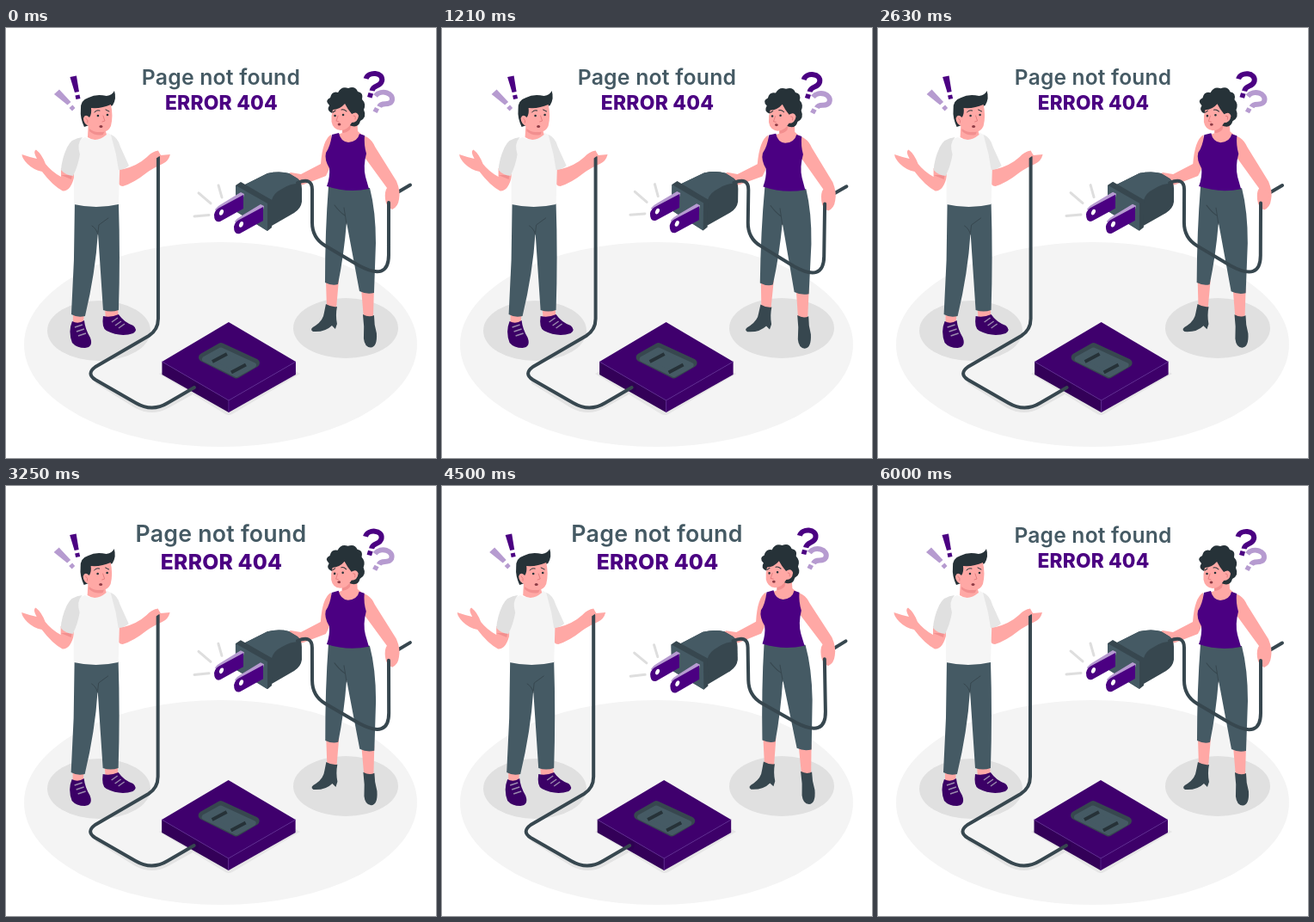
Write an HTML page that moves like this. It is 500 px wide and 500 px high and loops after 6.04 s.

```html
<!DOCTYPE html>
<html lang="en">
<head>
<meta charset="utf-8">
<title>Page not found</title>
<style>
  html, body { margin: 0; width: 100%; height: 100%; overflow: hidden; background: #fff; }
  svg { display: block; width: 100%; height: 100%; }
  text { font-family: Inter, Roboto, sans-serif; text-anchor: middle; letter-spacing: .2px; }
  .skin { fill: #ffa8a5; }
  .shade { fill: #f28f8f; }
  .hair { fill: #263238; }
  .slate { fill: #455a64; }
  .dark { fill: #37474f; }
  .purple { fill: #4b0082; }
  .plum { fill: #3b0066; }
  .lilac { fill: #b69bd0; }
  .line { fill: none; stroke: #37474f; stroke-width: 4; stroke-linecap: round; stroke-linejoin: round; }
  .thin { fill: none; stroke: #263238; stroke-width: 1; stroke-linecap: round; }
</style>
</head>
<body>
<svg viewBox="0 0 500 500">
  <!-- floor and shadows -->
  <ellipse cx="249.500" cy="368" rx="228.500" ry="119" fill="#f4f4f4"/>
  <g fill="#e0e0e0">
    <ellipse cx="108" cy="352" rx="60" ry="35"/>
    <ellipse cx="395" cy="349" rx="61" ry="35"/>
    <path fill="#e6e6e6" d="M178 402L259 356L342 402L263 449Q259 451 255 449Z"/>
  </g>
  <path class="line" style="stroke:#e3e3e3" d="M106 412L151 440Q170 450 188 440L215 425"/>

  <g id="title">
    <text x="250" y="66" font-size="24.500" font-weight="600" fill="#455a64">Page not found</text>
    <text x="250.500" y="95" font-size="22.600" font-weight="800" class="purple">ERROR 404</text>
  </g>

  <g id="left">
    <!-- exclamation marks -->
    <path class="purple" d="M74.500 57L82 55.500L85 74L80 75ZM80.500 78.500L85.500 77.500L86.500 82L81.500 83Z"/>
    <path class="lilac" d="M56 77L62 71.500L75.500 86L71.500 89.500ZM73.500 93L77.500 89.500L80.500 93L77 96.500Z"/>

    <!-- socket -->
    <path fill="#3f006d" d="M181.500 388L259 342L337 388L259 433Z"/>
    <path fill="#330058" d="M181.500 388L259 433V447L181.500 403Z"/>
    <path fill="#3d0069" d="M337 388L259 433V447L337 403Z"/>
    <path fill="none" stroke="#5a2590" stroke-width=".8" d="M181.500 388L259 433L337 388M259 433V447"/>
    <g stroke-linejoin="round" stroke-width="10">
      <path fill="#37474f" stroke="#37474f" d="M250 371L290 389.500L268 402.500L229 383Z"/>
      <path fill="#455a64" stroke="#455a64" stroke-width="6" d="M250 374.500L288 392L268 403L231 385Z"/>
    </g>
    <path fill="none" stroke="#263238" stroke-width="4" d="M240 388L257 379M262 400.500L279 391.500"/>
    <ellipse cx="220" cy="418" rx="4.500" ry="5.500" fill="#2e0052"/>

    <!-- legs -->
    <path class="skin" d="M78 330H91L90 344H78ZM115 326H130L131 337L116 338Z"/>
    <path class="plum" d="M77 341Q84 345 91 340Q92 350 98 360Q102 371 92 372Q82 372 77 366Q72 353 77 341Z"/>
    <path class="plum" d="M113 335Q122 337 131 333Q137 342 148 346Q154 351 148 355Q133 360 117 352Q111 349 113 335Z"/>
    <path fill="none" stroke="#9a8aac" stroke-width="1.500" d="M80 348L89 345M82 353L91 350M84 358L93 355M123 342L130 337M127 346L134 341M131 349L138 344"/>
    <path class="slate" d="M80 203L131 204Q133 265 131 328Q122 331 113 328L107 238Q104 285 92 335Q83 337 76 333L79 270Z"/>
    <path class="thin" style="stroke:#37474f" d="M107 238L108 229L119 221M107 240Q105 233 100 230"/>

    <!-- arms -->
    <path class="skin" d="M64 163L64 173Q53 167 46 158Q42 147 35 141.500Q31 143 36 152Q27 150 18.500 147Q19 152 25 158Q32 165 42 167Q54 183 66 189.500Q76 190 80 170Z"/>
    <path class="shade" d="M64 171L76 176L77 171Z"/>
    <path class="skin" d="M130 160L137 164Q153 160 164 150Q169 144 177 142.500L180 148L191 147Q189 155 182 158Q171 163 164 168Q149 180 136 184Q130 184 130 175Z"/>

    <!-- shirt -->
    <path fill="#f5f5f5" d="M92 127Q105 134 118 122Q130 126 133 139L131 205Q105 211 79 205V150Q78 132 92 127Z"/>
    <path fill="#e6e6e6" d="M122 124Q130 127 133 138L143 160Q138 165 131 165L128 147Z"/>
    <path fill="#e0e0e0" d="M89 127Q76 128 71 139Q65 152 64 165Q69 171 78 172Q84 160 86 147Q82 134 89 127Z"/>

    <!-- head -->
    <path class="skin" d="M96 108L95 127Q105 134 117 124L115 116Z"/>
    <path class="shade" d="M97 117Q105 124 115 119L113 124Q104 126 97 120Z"/>
    <path class="hair" d="M91 115Q86 104 87 95Q86 84 96 81Q105 76 117 79Q124 78 126 73Q129 82 124 90L102 99L97 113Z"/>
    <path class="skin" d="M99 93Q111 94 122 89Q125 102 122 114Q119 121 112 121Q103 121 98 115Q90 112 90 105Q92 99 97 104Q100 100 99 93Z"/>
    <g class="hair">
      <circle cx="107" cy="102" r="1.300"/><circle cx="118" cy="101" r="1.300"/>
      <ellipse cx="110.500" cy="114.500" rx="2" ry="1.600" fill="#8d3b45"/>
    </g>
    <path class="thin" d="M103 98Q105 95 109 96M116 95L120 97"/>
    <path class="thin" style="stroke:#e57f80" d="M113 102L115 108L112 109M93 105Q96 107 95 110"/>

    <!-- cord -->
    <path class="line" d="M177 150V338Q177 351 166 358L104 394Q93 402 104 409L151 436Q170 447 188 436L219 418"/>
    <path class="skin" d="M164 151Q169 145 176 143L180 148L174 152Q169 153 166 156Z"/>
  </g>

  <g id="right">
    <!-- question marks -->
    <g fill="none" stroke-width="6">
      <path stroke="#4b0082" d="M418.500 59C421 50 439 51 437 61.500C435 69 427 65.500 425.500 73"/>
      <path stroke="#b69bd0" d="M429.500 79C436 70.500 452 75.500 448.500 85C445 91.500 437 85 434 91.500"/>
    </g>
    <path class="purple" d="M421.500 75L427 76.500L425.500 81.500L420 80Z"/>
    <path class="lilac" d="M429 92L434 94.500L431.500 99L426.500 96.500Z"/>

    <path fill="none" stroke="#dedede" stroke-width="3" stroke-linecap="round" d="M247 183L251 197M224 192L238 204M219 219L236 217.500"/>

    <!-- legs -->
    <path class="skin" d="M372 293H387L384 327L373 325ZM413 302H428L427 338H416Z"/>
    <path class="dark" d="M372 321Q379 325 385 324Q383 334 385 344L383 350L379 346Q371 354 357 353Q352 350 360 346Q369 340 370 331Z"/>
    <path class="dark" d="M415 333Q422 337 428 334Q428 345 431 355Q432 371 424 371.500Q417 371 416 361Q417 347 415 333Z"/>
    <path class="slate" d="M375 184L423 186Q430 213 430 250L428 308Q419 310 411 306L396 226Q393 264 386 298Q379 300 371 296Q371 235 375 184Z"/>
    <path class="thin" style="stroke:#37474f" d="M396 228L393 209M394 218Q388 214 382 206"/>

    <!-- arms and torso -->
    <path class="line" d="M447 196L470 182.500"/>
    <path class="skin" d="M378 124Q368 130 366 158L343 170L331 168L323 173L328 180Q339 184 346 182L372 172Q379 160 380 140Z"/>
    <path class="skin" d="M408 124Q423 124 429 138L454 178Q459 190 457 199Q456 208 449 211Q442 208 441 199Q440 190 443 186L416 149Z"/>
    <path class="skin" d="M380 126L391 122L392 108L408 103L409 120L417 127L411 142H380Z"/>
    <path class="shade" d="M391 118Q399 116 402 110L400 118Q396 122 391 122Z"/>
    <path class="purple" d="M379 124L387 122Q389 132 398 133Q409 132 411 123L417 125Q416 136 419 146Q415 161 418 173L422 187Q397 192 373 184Q377 173 376 163Q370 153 372 145Q377 138 379 124Z"/>

    <!-- head -->
    <path class="hair" d="M379 99Q372 96 376 90Q370 84 377 81Q379 73 386 75Q390 67 398 70Q406 67 409 74Q416 75 414 83Q419 88 416 95Q420 104 412 108Q410 116 402 114Q390 111 386 97Z"/>
    <path class="skin" d="M380 95Q388 95 394 88Q397 94 402 100Q408 96 410 102Q409 110 402 110Q397 119 389 119Q380 118 378.500 109Q378 101 380 95Z"/>
    <g class="hair">
      <circle cx="382.500" cy="102" r="1.300"/><circle cx="392" cy="101" r="1.300"/>
      <ellipse cx="387.500" cy="112" rx="1.900" ry="1.500" fill="#8d3b45"/>
    </g>
    <path class="thin" d="M380 98L383 96M390 95Q393 94 396 97"/>
    <path class="thin" style="stroke:#e57f80" d="M386 102L384 108L387 109M404 102Q407 102 406 106"/>

    <!-- plug -->
    <path class="dark" d="M276 183L304 169Q318 166 329 169L339 175Q344 179 344 187V202Q343 210 335 215L309 230Z"/>
    <path class="slate" d="M276 183L304 169Q318 166 329 169L339 175Q342 177 343 181Q332 180 321 187Q311 192 309 200Z"/>
    <path class="dark" d="M267 183L273 179L309 200V232L304 236L267 213Z"/>
    <path class="slate" d="M267 183L304 204V236L267 213Z"/>
    <g id="prong">
      <path class="lilac" d="M243 211Q246 207 250 205L273 191L277 193L276 197L245 214Z"/>
      <path class="purple" d="M242 217Q243 211 250 208L276 194V210L249 225Q242 227 242 217Z"/>
      <ellipse cx="250.500" cy="214.500" rx="2.200" ry="3.500" fill="#fff" transform="rotate(25 250.500 214.500)"/>
    </g>
    <use href="#prong" x="23" y="14"/>

    <!-- cord -->
    <path class="line" d="M339 180Q356 173 356 188V226Q356 244 371 253L410 276Q445 295 445 264V203"/>
    <path class="skin" d="M443 187Q453 187 456 194L449 203L444 199Z"/>
  </g>
</svg>
<script>
  const LOOP = 6040, CYCLE = 6020, LEAD = 33;
  const [title, left, right] = ['title', 'left', 'right'].map(id => document.getElementById(id));

  // Each key is [position in the cycle, value]; values run linearly between keys.
  const beat = [[0, 1], [.1, 1.1], [.3, 1], [.4, 1], [.5, 1.1], [.6, 1], [1, 1]];
  const shake = [[0, 0], [.1, -1], [.2, 2], [.3, -4], [.4, 4], [.5, -4], [.6, 4], [.7, -4], [.8, 2], [.9, -1], [1, 0]];
  const sway = [[0, 0], [.25, 1], [.75, -1], [1, 0]];

  function at(keys, u) {
    const i = keys.findIndex(k => k[0] > u);
    const [a, from] = keys[i - 1], [b, to] = keys[i];
    return from + (to - from) * (u - a) / (b - a);
  }

  function draw(now) {
    const u = (now % LOOP + LEAD) / CYCLE % 1;
    title.setAttribute('transform', `translate(250 72) scale(${at(beat, u * 2 % 1)}) translate(-250 -72)`);
    left.setAttribute('transform', `translate(${at(shake, u)} 0)`);
    right.setAttribute('transform', `rotate(${at(sway, u)} 344 211)`);
  }

  const start = performance.now();
  function tick() {
    draw(performance.now() - start);
    requestAnimationFrame(tick);
  }
  tick();
</script>
</body>
</html>
```
